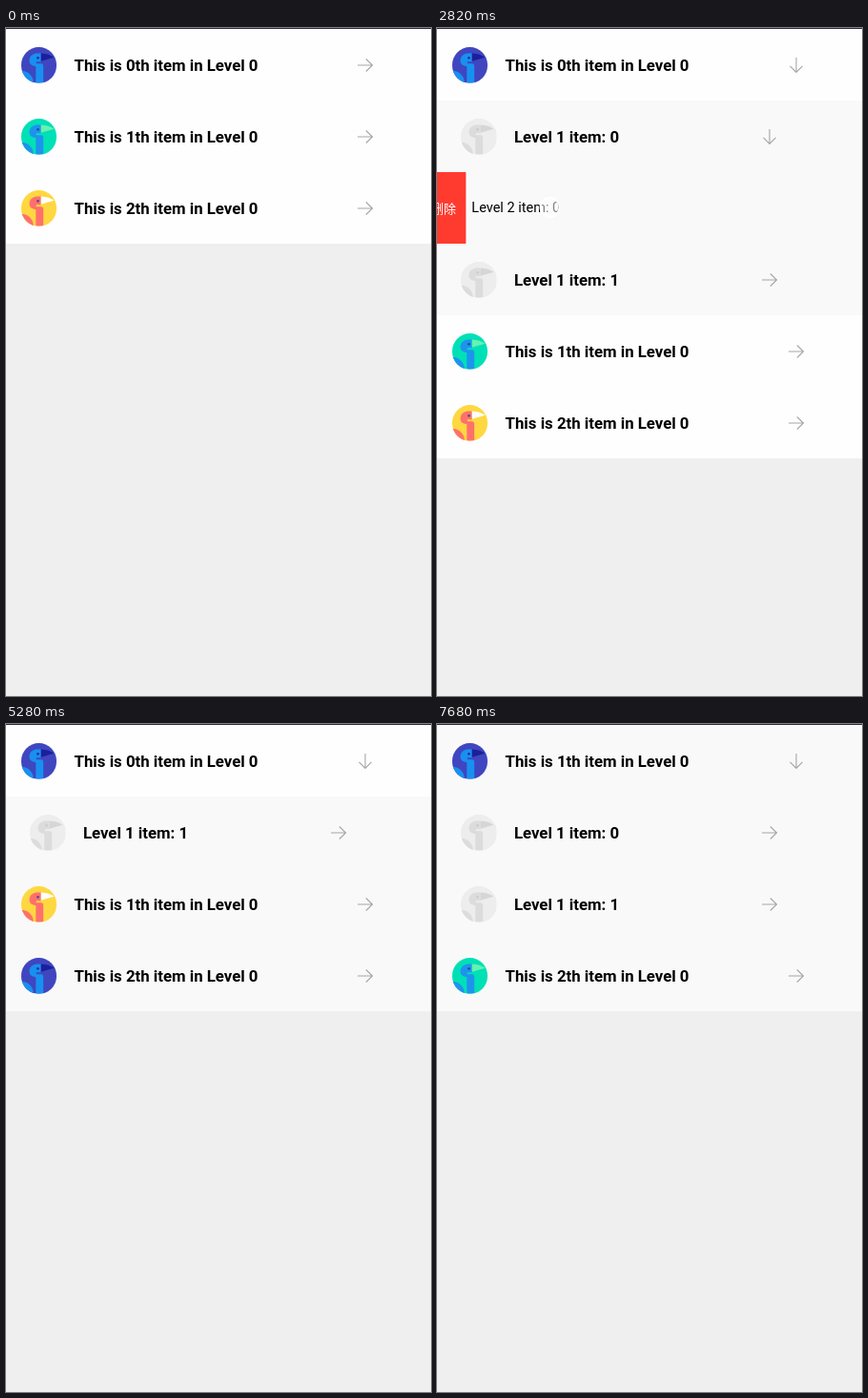
These frames come from a looping animation (446 px wide and 700 px high, 8000 ms). An HTML page:

```html
<!DOCTYPE html>
<html lang="en">
<head>
<meta charset="utf-8">
<title>Expandable swipe list</title>
<style>
  html, body { margin: 0; width: 100%; height: 100%; overflow: hidden; background: #efefef; }
  #stage { position: relative; width: 446px; height: 700px; overflow: hidden; background: #efefef; }
  .bar { position: absolute; left: 0; top: 0; width: 446px; height: 1px; background: #2a2a40; }
  .item { position: absolute; left: 0; top: 1px; width: 446px; height: 75px; overflow: hidden; }
  .slide, .face { position: absolute; left: 0; top: 0; width: 446px; height: 75px; }
  .label { position: absolute; top: 0; line-height: 76px; white-space: pre; color: #000;
    font: 700 16.8px/76px Roboto, sans-serif; }
  .level2 .label { font-weight: 400; font-size: 14.5px; }
  svg { position: absolute; overflow: hidden; }
  .arrow { fill: none; stroke: #a6a6a6; stroke-width: 1.1; }
  .menu { position: absolute; top: 0; height: 75px; display: flex; }
  .menu span { width: 46.67px; text-align: center; color: #fff;
    font: 13px/75px "Noto Sans CJK SC", "Noto Sans CJK", sans-serif; }
  .dot { position: absolute; left: -11px; top: -11px; width: 22px; height: 22px; border-radius: 50%;
    box-sizing: border-box; background: rgba(255,255,255,.5); border: 2px solid #fff; }
  .dot.glow { background: rgba(255,255,255,.62); border: 1px solid rgba(255,255,255,.5);
    box-shadow: 0 0 0 2px rgba(255,255,255,.14); }
  .dot.edge { background: rgba(255,255,255,.35); border: 1px solid #dcdcdc; }
</style>
</head>
<body>
<div id="stage"></div>
<script>
const LOOP = 8000, ROW = 75, MOVE = 250, FADE = 120;

// Start times of the list changes; each removal fades first, then rows move.
const OPEN0 = 950, OPEN1 = 1822, CUT2 = 3415, CUT1 = 4905, CUT0 = 6400, REOPEN = 7310;
const SHIFT2 = CUT2 + FADE, SHIFT1 = CUT1 + FADE, SHIFT0 = CUT0 + FADE;

// background, bird, beak, eye
const SKINS = {
  blue: ['#3f46c0', '#1890f0', '#1c1f9a', '#1c2f9a'],
  green: ['#00e0b6', '#1e93ee', '#66f2b0', '#1c4f9a'],
  yellow: ['#ffd740', '#ff706c', '#fff', '#4a4aa0'],
  gray: ['#ededed', '#dcdcdc', '#d6d6d6', '#ccc']
};
const LAYOUT = [
  { avatar: 15.5, label: 71.6, arrow: 376.5 },
  { avatar: 25, label: 80.9, arrow: 349 },
  { label: 6 }
];
const BUTTONS = [['置顶', '#c7c6cd'], ['编辑', '#ff9c00'], ['删除', '#ff3b30']];

// Each look is [time, skin, arrow]; moves and swipes are [time, duration, value].
const items = [
  { text: 'This is 0th item in Level 0', level: 0, row: 0, white: true, out: CUT0,
    looks: [[0, 'blue', 'r'], [OPEN0, 'blue', 'd']], swipes: [[5510, 320, -140], [CUT0, 0, 0]] },
  { text: 'Level 1 item: 0', level: 1, row: 1, in: OPEN0 + MOVE, out: CUT1,
    looks: [[0, 'gray', 'r'], [OPEN1, 'gray', 'd']], swipes: [[3890, 370, -140], [CUT1, 0, 0]] },
  { text: 'Level 2 item: 0', level: 2, row: 2, in: OPEN1 + MOVE, out: CUT2,
    looks: [[0]], swipes: [[2630, 320, 46.67], [CUT2, 0, 0]] },
  { text: 'Level 1 item: 1', level: 1, row: 2, in: OPEN0 + MOVE, out: CUT0,
    looks: [[0, 'gray', 'r'], [SHIFT2, 'gray', 'r'], [SHIFT1, 'gray', 'r']],
    moves: [[OPEN1, MOVE, 3], [SHIFT2, MOVE, 2], [SHIFT1, MOVE, 1]] },
  { text: 'This is 1th item in Level 0', level: 0, row: 1,
    looks: [[0, 'green', 'r'], [SHIFT2, 'blue', 'r'], [SHIFT1, 'yellow', 'r'],
      [SHIFT0, 'blue', 'r'], [REOPEN, 'blue', 'd']],
    moves: [[OPEN0, MOVE, 3], [OPEN1, MOVE, 4], [SHIFT2, MOVE, 3], [SHIFT1, MOVE, 2], [SHIFT0, MOVE, 0]] },
  { text: 'This is 2th item in Level 0', level: 0, row: 2,
    looks: [[0, 'yellow', 'r'], [SHIFT2, 'green', 'r'], [SHIFT1, 'blue', 'r'], [SHIFT0, 'green', 'r']],
    moves: [[OPEN0, MOVE, 4], [OPEN1, MOVE, 5], [SHIFT2, MOVE, 4], [SHIFT1, MOVE, 3],
      [SHIFT0, MOVE, 1], [REOPEN, MOVE, 3]] },
  { text: 'Level 1 item: 0', level: 1, row: 1, in: REOPEN + MOVE, looks: [[0, 'gray', 'r']] },
  { text: 'Level 1 item: 1', level: 1, row: 2, in: REOPEN + MOVE, looks: [[0, 'gray', 'r']] }
];

const touches = [
  { from: 780, to: 950, x: 372, y: 40 },
  { from: 1680, to: 1822, x: 340, y: 112 },
  { from: 2640, to: 2950, x: 88, y: 188, drag: [2630, 320, 135] },
  { from: 3300, to: CUT2, x: 24, y: 190, kind: 'glow' },
  { from: 3890, to: 4860, x: 322, y: 112.5, drag: [3890, 370, 182] },
  { from: 4740, to: CUT1, x: 420.5, y: 104, kind: 'glow' },
  { from: 5520, to: 5830, x: 330, y: 38, drag: [5510, 320, 190] },
  { from: 6300, to: CUT0, x: 433, y: 22.5, kind: 'glow' },
  { from: CUT0, to: SHIFT0, x: 433, y: 22.5, kind: 'edge' },
  { from: 7140, to: REOPEN, x: 199, y: 55, kind: 'edge' }
];

const stage = document.getElementById('stage');

function add(parent, cls, html = '') {
  const el = document.createElement('div');
  el.className = cls;
  el.innerHTML = html;
  parent.append(el);
  return el;
}

function avatar(x, skin) {
  const [back, bird, beak, eye] = SKINS[skin];
  return `<svg style="left:${x}px;top:19px;border-radius:50%" width="37.5" height="37.5" viewBox="0 0 38 38">
    <rect width="38" height="38" fill="${back}"/>
    <g fill="${bird}"><circle cx="0" cy="38" r="13"/>
    <path d="M21 6.500H16Q8.500 8 8.500 14.500Q9 20 15.500 20.500V38H23.500V20Q23.500 17.500 21 17.500H16V15.500H21Z"/></g>
    <path d="M21 6.500Q30 7 35 11L21 15Z" fill="${beak}"/>
    <circle cx="17.700" cy="11.500" r="1.300" fill="${eye}"/></svg>`;
}

function arrow(x, dir) {
  const turn = dir === 'd' ? 90 : 0;
  return `<svg class="arrow" style="left:${x - 10}px;top:28px" width="20" height="20" viewBox="-10 -10 20 20">
    <path transform="rotate(${turn})" d="M-8 0H7.500M.8-6.500L7.500 0L.8 6.500"/></svg>`;
}

function menu(level) {
  const cells = (level === 2 ? BUTTONS.slice(2) : BUTTONS)
    .map(([name, color]) => `<span style="background:${color}">${name}</span>`).join('');
  return `<div class="menu" style="left:${level === 2 ? -46.67 : 446}px">${cells}</div>`;
}

function build(item) {
  const at = LAYOUT[item.level];
  item.el = add(stage, 'item level' + item.level);
  item.slide = add(item.el, 'slide');
  item.faces = item.looks.map(([, skin, dir], i) => {
    const face = add(item.slide, 'face',
      (skin ? avatar(at.avatar, skin) + arrow(at.arrow, dir) : '') +
      `<div class="label" style="left:${at.label}px">${item.text}</div>`);
    face.style.background = item.white || (item.level === 0 && i === 0) ? '#fefefe' : '#f9f9f9';
    return face;
  });
  if (item.swipes) item.slide.insertAdjacentHTML('beforeend', menu(item.level));
}

// Accelerate-decelerate progress of a span of time.
function ease(t, start, span) {
  const p = span ? Math.min(1, Math.max(0, (t - start) / span)) : +(t >= start);
  return (1 - Math.cos(Math.PI * p)) / 2;
}

function track(t, value, steps = []) {
  for (const [start, span, to] of steps) value += (to - value) * ease(t, start, span);
  return value;
}

function drawItem(item, t) {
  let alpha = 1;
  if (item.in) alpha *= ease(t, item.in, FADE);
  if (item.out) alpha *= 1 - ease(t, item.out, FADE);
  item.el.style.display = alpha > 0 ? '' : 'none';
  item.el.style.opacity = alpha;
  item.el.style.transform = `translateY(${track(t, item.row, item.moves) * ROW}px)`;
  item.slide.style.transform = `translateX(${track(t, 0, item.swipes)}px)`;
  item.faces.forEach((face, i) => {
    const next = item.looks[i + 1];
    const shown = i ? ease(t, item.looks[i][0], MOVE) : 1;
    face.style.opacity = shown * (next ? 1 - ease(t, next[0], MOVE) : 1);
  });
}

function drawTouch(touch, t) {
  const x = touch.drag ? track(t, touch.x, [touch.drag]) : touch.x;
  touch.el.style.display = t >= touch.from && t < touch.to ? '' : 'none';
  touch.el.style.transform = `translate(${x}px, ${touch.y}px)`;
}

items.forEach(build);
touches.forEach(touch => { touch.el = add(stage, 'dot ' + (touch.kind || '')); });
add(stage, 'bar');

const began = performance.now();
function frame() {
  const t = (performance.now() - began) % LOOP;
  items.forEach(item => drawItem(item, t));
  touches.forEach(touch => drawTouch(touch, t));
  requestAnimationFrame(frame);
}
frame();
</script>
</body>
</html>
```
